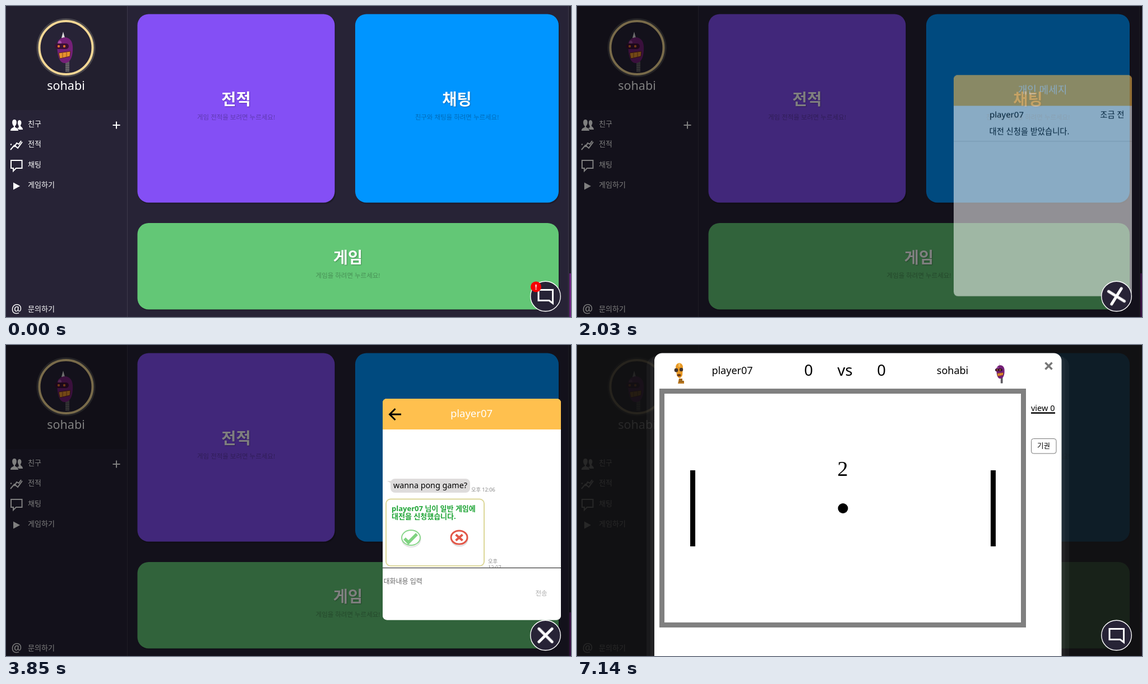
Write an HTML page that moves like this. It is 1008 px wide and 556 px high and loops after 8000 ms.

```html
<!DOCTYPE html>
<html lang="ko">
<head>
<meta charset="utf-8">
<title>게임 대전 신청</title>
<style>
html, body { margin: 0; height: 100%; overflow: hidden; background: #272336; }
svg { display: block; width: 100%; height: 100%; font-family: "Noto Sans", "Noto Sans CJK KR", "Noto Sans CJK", sans-serif; }
.mid { text-anchor: middle; }
.end { text-anchor: end; }
.b { font-weight: 700; }
.m { font-weight: 500; }
.line { fill: none; stroke: #fff; stroke-width: 2; }
.title { font-size: 28.5px; font-weight: 700; fill: #fff; text-anchor: middle; text-shadow: 1px 1px 2px rgba(0, 0, 0, .3); }
.hint { font-size: 11.5px; fill: rgba(0, 0, 0, .28); text-anchor: middle; }
.menu { font-size: 13px; font-weight: 500; fill: #fff; }
.time { font-size: 9.2px; fill: #888; }
.score { font-size: 27.5px; text-anchor: middle; }

/* Hard switches */
.step { animation: 8s step-end infinite; }
.badge { animation-name: badge; }
.talk { animation-name: talk; }
.opened { animation-name: opened; }
.face { animation-name: face; }
.match { animation-name: match; }
.loading { animation-name: loading; }
.ready { animation-name: ready; }
.status { animation-name: status; }
.three { animation-name: three; }
.two { animation-name: two; }
@keyframes badge { 0% { opacity: 1 } 23.5%, 100% { opacity: 0 } }
@keyframes talk { 0% { opacity: 1 } 23.5% { opacity: 0 } 75.1%, 100% { opacity: 1 } }
@keyframes opened { 0% { opacity: 0 } 23.5% { opacity: 1 } 75.1%, 100% { opacity: 0 } }
@keyframes face { 0% { opacity: 0 } 32.3%, 100% { opacity: 1 } }
@keyframes match { 0% { opacity: 0 } 75.1%, 100% { opacity: 1 } }
@keyframes loading { 0% { opacity: 1 } 77.8%, 100% { opacity: 0 } }
@keyframes ready { 0% { opacity: 0 } 77.8%, 100% { opacity: 1 } }
@keyframes status { 0% { opacity: 1 } 80.4%, 100% { opacity: 0 } }
@keyframes three { 0% { opacity: 1 } 89.1%, 100% { opacity: 0 } }
@keyframes two { 0% { opacity: 0 } 89.1%, 100% { opacity: 1 } }

/* Eased motion */
.panel { animation: panel 8s linear infinite; }
.chat { animation: chat 8s linear infinite; }
.accept { animation: accept 8s linear infinite; }
.cross { transform-origin: 962.5px 519px; animation: cross 8s linear infinite; }
@keyframes panel {
  0%, 23.49% { opacity: 0; transform: translateY(60px) }
  23.5% { opacity: .04; transform: translateY(57px); animation-timing-function: cubic-bezier(.25, .2, .2, 1) }
  30.6%, 75.09% { opacity: 1; transform: none }
  75.1%, 100% { opacity: 0; transform: none }
}
@keyframes chat {
  0%, 41% { opacity: 0; animation-timing-function: ease }
  47.5%, 100% { opacity: 1 }
}
@keyframes accept {
  0%, 61.3% { opacity: .55 }
  64.6%, 100% { opacity: 1 }
}
@keyframes cross {
  0%, 23.5% { transform: none; animation-timing-function: ease }
  28%, 100% { transform: rotate(45deg) }
}
</style>
</head>
<body>
<svg viewBox="0 0 1008 556" preserveAspectRatio="none">
  <defs>
    <g id="violet-bot">
      <path d="M19 52h7v20h-7z" fill="#55525a"/>
      <path d="M19 56h7m-7 4h7m-7 4h7m-7 4h7" stroke="#777" fill="none"/>
      <path d="M12 11 15 0l3 11z" fill="#ddd"/>
      <path d="M4 24C5 6 31 4 32 26c1 20-5 30-14 30S5 46 4 24z" fill="#752078"/>
      <ellipse cx="9" cy="20" rx="3" ry="4" fill="#a44fa4"/>
      <rect y="21" width="25" height="10" rx="5" fill="#3b1034"/>
      <circle cx="7" cy="26" r="2.2" fill="#e0722c"/>
      <circle cx="17" cy="26" r="2.2" fill="#e0722c"/>
      <path d="M7 38l21-3-1 9-18 4z" fill="#e8912d" stroke="#592020"/>
      <path d="M14 37v9m7-10v9" stroke="#8a4a20"/>
    </g>
    <g id="amber-bot">
      <path d="M9 29h6v4h3v5H7z" fill="#b9771f"/>
      <path d="M9 31h6m-6 3h8" stroke="#6f4a18"/>
      <path d="M3 8C4-1 15-1 16 8l-1 15q-5 10-10 0z" fill="#e99a26"/>
      <path d="M8 1h3v7H8z" fill="#f4bd5c"/>
      <circle cx="4" cy="14" r="3.4" fill="#44342a"/>
      <circle cx="13" cy="13" r="3.2" fill="#44342a"/>
      <ellipse cx="9" cy="23" rx="3.5" ry="2.2" fill="#713c16"/>
    </g>
    <g id="missing">
      <path d="M.5.5h44v44H.5z" fill="#fff" stroke="#c4c4c4"/>
      <path d="M3.5 3.5h9l4 4v9h-13z" fill="#c9dcf8" stroke="#a0a0a0"/>
      <path d="M4 16l5-6 3 3-3 3z" fill="#43a047"/>
      <path d="M9 17l8-8v8z" fill="#fff"/>
    </g>
    <clipPath id="log"><path d="M672 151h318v247H672z"/></clipPath>
  </defs>

  <!-- Home -->
  <rect width="1008" height="556" fill="#272336"/>
  <path d="M0 0h216v186H0z" fill="#221f2e"/>
  <path d="M216.5 0v556M1003.5 0v556" stroke="#3d394a"/>
  <path d="M1004 0h4v556h-4z" fill="#211e2c"/>
  <path d="M1005 478h3v78h-3z" fill="#6c2480"/>
  <circle cx="107" cy="74.500" r="52.500" fill="#4b484e"/>
  <circle cx="107" cy="74.500" r="47.500" fill="#272336" stroke="#f4d795" stroke-width="4"/>
  <use href="#violet-bot" x="87" y="46"/>
  <text class="mid" x="107" y="150" font-size="21.500" fill="#fff">sohabi</text>

  <g fill="#fff">
    <path d="M20 218c4 0 3-3 2-5-2-4-1-9 2-9s5 5 2 9c-1 3 4 3 4 8h-7z"/>
    <path d="M8 223c0-6 7-5 6-8-4-4-4-12 1-12s5 8 1 12c-1 3 6 2 6 8z"/>
    <path d="M13 315.500l12 6.500-12 6.500z"/>
  </g>
  <path class="line" d="M190.500 213h13m-6.500-6.500v13"/>
  <path class="line" d="M8 257l7-8 6 5 8-11M8 248l2-1m5 5 4-7 4 2 4-6"/>
  <path class="line" d="M9 276h19.500v14H18l-5 5v-5H9z"/>
  <text class="mid" x="19" y="549" font-size="21" fill="#fff">@</text>
  <g class="menu">
    <text x="39" y="215">친구</text>
    <text x="39" y="251">전적</text>
    <text x="39" y="287.500">채팅</text>
    <text x="39" y="324">게임하기</text>
    <text x="39" y="545.500">문의하기</text>
  </g>

  <g fill="rgba(0,0,0,.22)">
    <rect x="235.500" y="16" width="353" height="338" rx="20"/>
    <rect x="624.500" y="16" width="363" height="338" rx="20"/>
    <rect x="235.500" y="389.500" width="752" height="155" rx="20"/>
  </g>
  <rect x="234.500" y="14.500" width="352" height="337" rx="20" fill="#844ff5"/>
  <rect x="623" y="14.500" width="363" height="337" rx="20" fill="#0095ff"/>
  <rect x="234.500" y="388" width="751.500" height="154.500" rx="20" fill="#63c776"/>
  <text class="title" x="410.500" y="177">전적</text>
  <text class="title" x="804.500" y="177">채팅</text>
  <text class="title" x="610" y="459.500">게임</text>
  <text class="hint" x="410.500" y="203">게임 전적을 보려면 누르세요!</text>
  <text class="hint" x="804.500" y="203">친구와 채팅을 하려면 누르세요!</text>
  <text class="hint" x="610" y="485.500">게임을 하려면 누르세요!</text>

  <rect class="step opened" width="1008" height="556" fill="rgba(0,0,0,.5)"/>

  <!-- Messages -->
  <g class="panel">
    <rect x="672" y="96" width="318" height="395.500" rx="8" fill="#fff"/>
    <path d="M672 151v-47q0-8 8-8h302q8 0 8 8v47z" fill="#ffc04e"/>
    <text class="mid m" x="830.500" y="128.500" font-size="18" fill="#fff">개인 메세지</text>
    <use class="step face" href="#amber-bot" x="695" y="168"/>
    <text x="736" y="172" font-size="15">player07</text>
    <text class="end" x="976.500" y="172" font-size="14.300">조금 전</text>
    <text x="735.500" y="201.500" font-size="14.300">대전 신청을 받았습니다.</text>
    <path d="M672 214.500h318" stroke="#ddd"/>

    <g class="chat">
      <rect x="672" y="150" width="318" height="341.500" rx="8" fill="#fff"/>
      <path d="M672 151v-47q0-8 8-8h302q8 0 8 8v47z" fill="#ffc04e"/>
      <path d="M705 124h-20m9.500-10-10 10 10 10" fill="none" stroke="#000" stroke-width="3"/>
      <text class="mid" x="830.500" y="129" font-size="18.500" fill="#fff">player07</text>
      <path d="M680 243h14v9z" fill="#dedcdc"/>
      <rect x="686" y="239" width="142" height="25" rx="8" fill="#dedcdc"/>
      <text x="691" y="256" font-size="14.300">wanna pong game?</text>
      <text class="time" x="830" y="261.500">오후 12:06</text>
      <rect x="678" y="275.500" width="175" height="119.500" rx="8" fill="#fff" stroke="#dcd798" stroke-width="2"/>
      <g class="b" font-size="13" fill="#1fa536">
        <text x="688" y="296.500">player07 님이 일반 게임에</text>
        <text x="688" y="311">대전을 신청했습니다.</text>
      </g>
      <g class="accept" fill="none">
        <ellipse cx="723" cy="347.500" rx="16.500" ry="13.500" stroke="#ccc" stroke-width="2"/>
        <ellipse cx="722.500" cy="344.500" rx="16.500" ry="13.500" fill="#fff" stroke="#2cb52f" stroke-width="2"/>
        <path d="M711 346l7 7 15-15" stroke="#17b01c" stroke-width="5.500"/>
      </g>
      <g fill="none">
        <ellipse cx="809" cy="347" rx="14.500" ry="12.500" stroke="#ddd" stroke-width="2"/>
        <ellipse cx="808.500" cy="344" rx="14.500" ry="12" fill="#fff" stroke="#e25748" stroke-width="3"/>
        <path d="M802.500 339l12 10.500m0-10.500-12 10.500" stroke="#e25748" stroke-width="4"/>
      </g>
      <g class="time" clip-path="url(#log)">
        <text x="860" y="390">오후</text>
        <text x="860" y="401">12:07</text>
      </g>
      <path d="M672 398.500h318" stroke="#111"/>
      <text x="673.500" y="427" font-size="12" fill="#666">대화내용 입력</text>
      <text x="944.500" y="447.500" font-size="11.500" fill="#aaa">전송</text>
    </g>
  </g>

  <!-- Match -->
  <g class="step match">
    <rect width="1008" height="556" fill="rgba(16,16,16,.9)"/>
    <rect x="124" y="20" width="754" height="560" rx="18" fill="rgba(255,255,255,.035)"/>
    <rect x="131" y="17" width="740" height="560" rx="16" fill="rgba(255,255,255,.035)"/>
    <rect x="138" y="14.500" width="726.500" height="570" rx="14" fill="#fff"/>
    <rect x="151.500" y="82.500" width="645" height="418" fill="#fff" stroke="#808080" stroke-width="9"/>
    <text x="810" y="118" font-size="14.500">view 0</text>
    <path d="M810 121.500h43" stroke="#000" stroke-width="2.500"/>
    <rect x="810.500" y="167.500" width="44.500" height="26.500" rx="4" fill="#fff" stroke="#777"/>
    <text class="mid" x="832.500" y="185" font-size="12.500">기권</text>

    <g class="step loading">
      <use href="#missing" x="181" y="24"/>
      <use href="#missing" x="713" y="24"/>
      <text class="score" x="361.500" y="54.500">0</text>
      <text class="score" x="469" y="54.500">vs</text>
      <text class="score" x="577" y="54.500">0</text>
    </g>

    <g class="step ready">
      <use href="#amber-bot" x="173" y="31"/>
      <use href="#violet-bot" transform="translate(746 31) scale(.52)"/>
      <text class="mid" x="277" y="52" font-size="18">player07</text>
      <text class="mid" x="670" y="52" font-size="18">sohabi</text>
      <text class="score" x="413" y="54.500">0</text>
      <text class="score" x="478" y="54.500">vs</text>
      <text class="score" x="543" y="54.500">0</text>
      <path d="M835.500 31.500l12 12m0-12-12 12" stroke="#777" stroke-width="3.500"/>
      <path d="M202 224h9v136h-9zm536 0h9v136h-9z"/>
      <circle cx="474.500" cy="292" r="9"/>
      <g class="mid" font-family="'Liberation Serif', serif" font-size="38">
        <text class="step three" x="474" y="234">3</text>
        <text class="step two" x="474" y="234">2</text>
      </g>
    </g>

    <g class="step status">
      <path d="M0 542h328q4 0 4 4v10H0z" fill="#383541"/>
      <text x="3" y="555.500" font-size="10.600" fill="#eee">gravatar.com의 응답을 기다리는 중...</text>
    </g>
  </g>

  <!-- Floating button -->
  <circle cx="962.500" cy="519" r="26.800" fill="#272336" stroke="#fff" stroke-width="1.400"/>
  <path class="step talk" d="M950 507.500h25.500v24l-6.500-5h-19z" fill="none" stroke="#fff" stroke-width="3"/>
  <g class="step badge">
    <circle cx="945.500" cy="502" r="9.500" fill="#f50000"/>
    <text class="mid b" x="945.500" y="506.500" font-size="12.500" fill="#fff">!</text>
  </g>
  <g class="step opened">
    <path class="cross" d="M946 519h33m-16.500-16.500v33" stroke="#fff" stroke-width="5" stroke-linecap="round"/>
  </g>
</svg>
</body>
</html>
```
